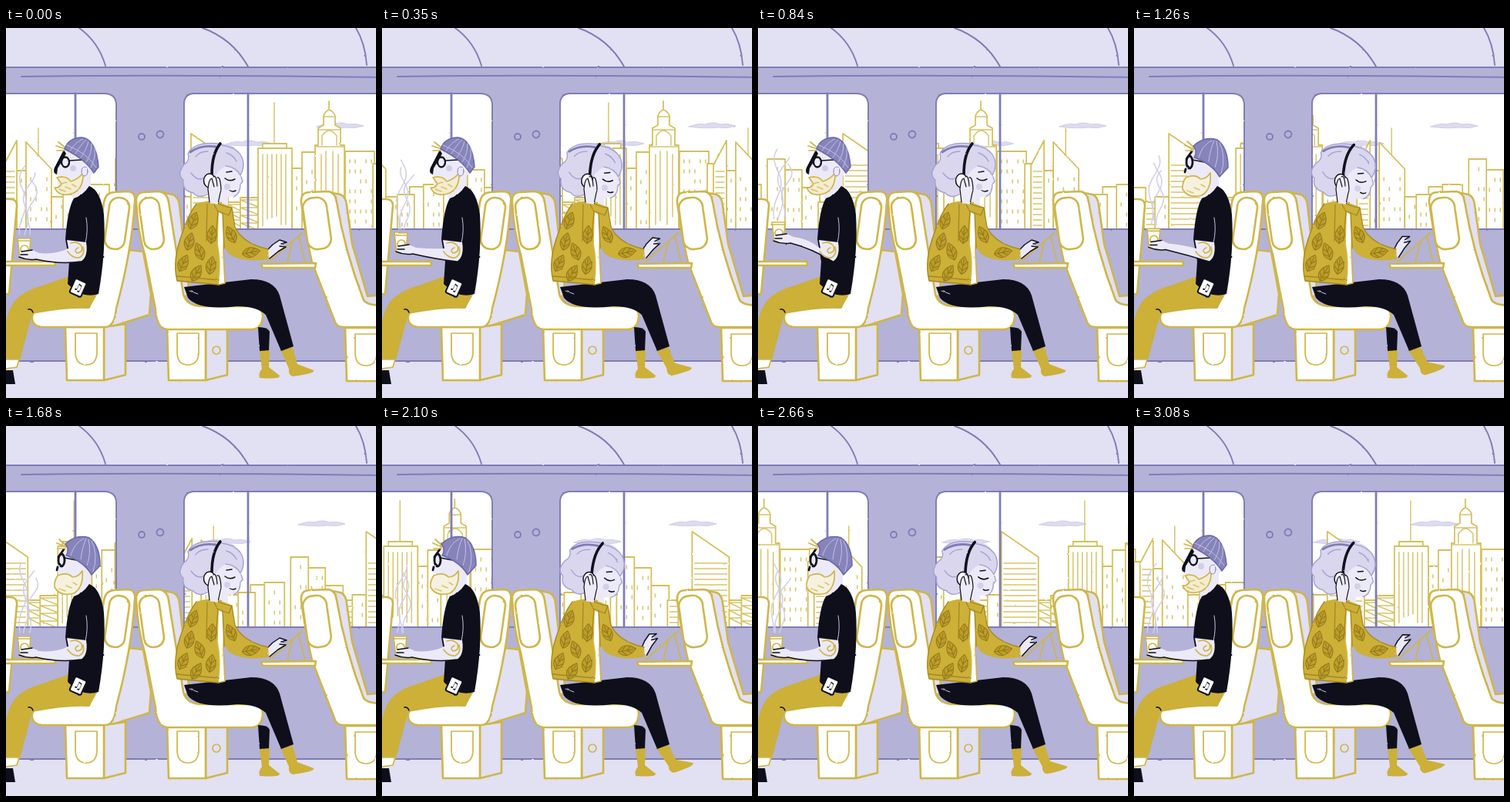
An HTML page for the animation above (3150 ms loop, 480 by 480 pixels).

```html
<!DOCTYPE html>
<html lang="en">
<head>
<meta charset="utf-8">
<title>Train ride</title>
<style>
html, body { margin: 0; width: 100%; height: 100%; overflow: hidden; background: #e3e1f4 }
svg { display: block; width: 100vw; height: 100vh }
path, rect, circle, ellipse { stroke-linecap: round; stroke-linejoin: round }
.gold { stroke: #cfb649; stroke-width: 2.6 }
.thin { stroke-width: 1.7 }
.white { fill: #fff }
.lilac { fill: #e2e0f3 }
.line { fill: none; stroke: #7f7cb6; stroke-width: 1.9 }
.ink { fill: none; stroke: #10111d; stroke-width: 1.5 }
.bold { stroke-width: 2.8 }
.black { fill: #0e0f1b }
.skin { fill: #eceaf8 }
.cloth { fill: #ccb038 }
.seam { fill: none; stroke: #a48820; stroke-width: 1.3 }
.leaf { fill: #bd9f2b; stroke: #95791a; stroke-width: 1.2 }
.cap { fill: #8684bb; stroke: #6b68a6; stroke-width: 1.5 }
.rib { fill: none; stroke: #c3c1e2; stroke-width: 1 }
.city { fill: #fff; stroke: #d5c05c; stroke-width: 1.8 }
.mark { fill: none; stroke: #d8c56c; stroke-width: 1.5 }
.cloud { fill: #dddbf0; stroke: #d0ceea; stroke-width: 1 }
.steam { fill: none; stroke: #d0cee9; stroke-width: 1.5 }
</style>
</head>
<body>
<svg viewBox="0 0 480 480">
<defs>
  <filter id="rough" x="-10" y="-10" width="500" height="500" filterUnits="userSpaceOnUse" color-interpolation-filters="sRGB">
    <feTurbulence type="fractalNoise" baseFrequency=".13" numOctaves="2" seed="4"/>
    <feDisplacementMap in="SourceGraphic" scale="1.7" xChannelSelector="R" yChannelSelector="G"/>
  </filter>
  <path id="panes" d="M-9 85H129Q143 86 143 100V261H-9ZM490 85H243Q231 86 231 99V261H490Z"/>
  <clipPath id="view"><use href="#panes"/></clipPath>
  <g id="skyline"></g>
  <path id="leaf" class="leaf" d="M0 13Q-14 3 0 -13Q14 3 0 13V-9M0 8l6-6M0 8l-6-6M0 1l4-6M0 1l-4-6"/>
  <path id="puff" class="cloud" d="M-30 1Q-18-4-9-2Q2-6 10-2Q20-4 31 0Q20 4 8 2Q-8 4-30 1Z"/>
  <g id="base">
    <path class="lilac gold" d="M50 0L78-4V62L50 69Z"/>
    <path class="white gold" d="M0 0H50V69H2Z"/>
    <path class="white gold thin" d="M13 8H41V34Q40 49 27 49Q14 49 13 34Z"/>
  </g>
</defs>
<g filter="url(#rough)">
  <rect class="lilac" x="-9" y="-9" width="498" height="498"/>
  <rect fill="#b4b2d7" x="-9" y="51" width="498" height="381"/>
  <path class="line" d="M-9 51H490M20 63Q200 60 490 64M-9 432H490M95 0Q120 18 129 49M255 0Q294 14 314 50M454 0Q466 20 468 48"/>
  <circle class="line" cx="176" cy="141" r="4"/><circle class="line" cx="200" cy="138" r="4.5"/>
  <use href="#panes" fill="#fff"/>
  <g clip-path="url(#view)">
    <use id="cloud1" href="#puff"/><use id="cloud2" href="#puff"/>
    <g id="city"><use href="#skyline"/><use href="#skyline" x="487"/></g>
  </g>
  <path class="line bold" d="M90 85V261M314 85V261"/>
  <use href="#panes" class="line"/>
  <path class="line" d="M143 261H231"/>

  <!-- far seats -->
  <path class="white gold" d="M-8 222H5Q15 222 14 232L4 345H-8Z"/>
  <path class="lilac gold" d="M418 213L434 216Q441 219 442 230L449 280L469 348L490 346V364H466Z"/>
  <path class="white gold" d="M383 226Q382 213 394 213L418 212Q427 213 429 226Q440 292 464 353Q468 360 490 360V388H438Q428 388 426 379L397 304Q388 265 383 226Z"/>
  <rect class="white gold" x="388" y="220" width="31" height="67" rx="13" transform="rotate(-8 403 254)"/>
  <use href="#base" x="440" y="389"/>

  <!-- left seat -->
  <path class="lilac gold" d="M160 288L178 290L188 345L186 372L135 388Z"/>
  <use href="#base" x="77" y="388"/>
  <path class="white gold" d="M127 226Q129 214 140 213L158 212Q169 213 167 226Q163 290 143 364Q141 388 128 388H47Q33 387 34 374Q37 362 55 362H108Z"/>
  <rect class="white gold" x="131" y="220" width="26" height="67" rx="12" transform="rotate(8 144 254)"/>

  <!-- middle seat -->
  <path class="lilac gold" d="M200 213L216 216Q224 219 225 230L238 345L222 355Z"/>
  <use href="#base" x="209" y="388"/>
  <circle class="gold thin" fill="none" cx="273" cy="418" r="5"/>
  <path class="white gold" d="M169 226Q168 213 180 213L198 212Q209 213 211 226L230 345Q234 361 255 361H322Q333 363 333 374Q332 390 319 391H209Q195 389 194 365L180 294Q171 265 169 226Z"/>
  <rect class="white gold" x="176" y="220" width="26" height="67" rx="12" transform="rotate(-8 189 254)"/>

  <!-- man -->
  <path class="white gold" d="M-8 303H64V308H-8Z"/>
  <path class="cloth" d="M88 320L45 335Q8 345 2 374L-8 405V431H18L34 371Q80 362 108 364L119 344Z"/>
  <path class="white gold thin" d="M-8 430H17L14 440L-8 443Z"/>
  <path class="black" d="M-8 444H9L12 462H-8Z"/>
  <path class="ink" d="M29 365Q33 364 35 369"/>
  <path class="skin" d="M84 190H110V222H86Z"/>
  <path class="black" d="M108 205Q123 211 127 242Q130 288 120 345Q99 352 80 332L82 303L77 274Q80 234 88 221Q100 217 108 205Z"/>
  <path class="rib" d="M104 246Q107 262 103 279"/>
  <g id="steam"></g>
  <g id="cup">
    <path class="white gold thin" d="M15 273H32L30 299H18ZM14 276H32"/>
    <circle class="white gold thin" cx="24" cy="287" r="5"/>
  </g>
  <path id="arm" class="skin"/><path id="armLine" class="ink"/>
  <path class="gold thin" fill="none" d="M84 279Q93 276 98 283Q101 291 92 292Q87 288 94 285M80 290Q86 299 95 298Q103 294 100 284"/>
  <g transform="rotate(24 94 336)">
    <rect class="white" stroke="#10111d" stroke-width="2" x="86" y="327" width="16" height="20" rx="2"/>
    <text x="94" y="341" text-anchor="middle" font-family="DejaVu Sans, sans-serif" font-size="13" fill="#10111d">♫</text>
  </g>
  <g id="headA">
    <path class="skin" d="M77 157L62 184Q61 190 67 192V205Q80 213 98 206L114 187L100 160Z"/>
    <path fill="#f3ecd0" class="gold thin" d="M66 194Q78 191 84 199Q94 196 100 188Q101 207 88 214Q69 221 63 207Q69 208 72 202Z"/>
    <path class="mark" d="M69 209l8 3M77 206l7 3M86 203l5 3M72 202l7-2"/>
    <path class="black" d="M75 158L63 181Q60 188 66 190L67 182L73 172L78 163Z"/>
    <ellipse class="ink" style="stroke-width:2.3" cx="77" cy="174" rx="5" ry="6.5"/>
    <path class="ink" d="M82 172L99 171"/>
    <circle fill="#cfcdea" cx="87" cy="182" r="4"/>
    <ellipse class="skin" stroke="#8684bb" cx="102" cy="186" rx="4" ry="6"/>
    <path class="gold thin" fill="none" d="M78 156L68 148M77 157L65 153M76 159L66 159"/>
    <path class="cap" d="M76 157Q81 142 99 142Q117 145 120 180L114 188Q104 171 76 157Z"/>
    <path class="rib" d="M83 159Q90 148 100 144M90 163Q98 150 104 145M97 168Q105 157 107 147M104 174Q112 161 111 150M110 181Q117 168 115 155M79 152Q105 162 117 181"/>
  </g>
  <g id="headB">
    <path class="skin" d="M77 157L65 184Q65 190 70 192V206Q84 214 100 206L114 187L100 160Z"/>
    <path fill="#f6f1de" class="gold thin" d="M67 194Q80 189 86 196Q94 196 99 188Q101 209 88 217Q70 222 63 209Q62 202 67 194Z"/>
    <path class="mark" d="M69 211l8 3M78 207l7 3M87 203l5 3"/>
    <path class="ink bold" d="M75 160L68 170M67 183l-1 4"/>
    <ellipse class="ink bold" cx="72" cy="174" rx="4" ry="8"/>
    <path class="ink" d="M76 171L91 174"/>
    <path class="gold thin" fill="none" d="M79 156L69 147M78 157L66 152M77 159L67 159"/>
    <path class="cap" d="M77 153Q91 140 108 145Q122 155 122 181L111 193Q101 176 78 168Q83 160 77 153Z"/>
    <path class="rib" d="M84 168Q88 152 101 146M97 173Q99 156 104 146M105 181Q111 165 107 147M113 189Q120 166 111 149"/>
  </g>

  <!-- laptop -->
  <path class="white gold" d="M331 306L402 305L401 311L333 311Z"/>
  <path class="gold thin" fill="none" d="M342 303L384 266M371 279L365 303M380 271L388 304"/>

  <!-- woman -->
  <path class="black" d="M327 388Q340 388 342 394L341 419H329Z"/>
  <path class="cloth" d="M329 419L342 418L341 440L355 451Q356 456 329 454Q327 448 332 442Z"/>
  <path id="foot" class="cloth" d="M356 417L371 413L378 436L399 444Q402 448 372 452Q366 450 367 442Z"/>
  <path class="black" d="M231 336L318 326Q348 326 355 347L373 413L357 419L337 372Q325 361 300 361Q250 367 236 350Z"/>
  <path class="rib" d="M238 341l11 4"/>
  <g id="hand">
    <path class="skin" d="M336 289L346 281L355 275L364 278L358 281L363 284L353 290L341 299Z"/>
    <path class="ink" d="M338 289L346 281L355 275L364 278L357 280M355 283L363 284L353 290L342 299"/>
  </g>
  <path class="skin" d="M268 208H288V232H268Z"/>
  <path class="cloth" d="M247 228Q262 222 280 226L278 333L222 328Q215 302 229 265Q237 241 247 228Z"/>
  <path class="white gold thin" d="M275 238L284 242L282 290L284 331L275 333Q279 305 274 280Z"/>
  <path class="cloth" d="M268 224Q284 228 293 233L297 258Q306 279 340 287L341 300Q306 305 289 293L283 284L281 242Z"/>
  <g id="leaves"></g>
  <path class="seam" d="M247 228Q237 241 229 265Q215 302 222 328L276 333M261 229L260 276M275 238L272 276M281 240L283 286M293 233L297 258Q306 279 340 287M222 322L276 327M268 224Q281 232 293 233L289 243L274 237Z"/>
  <g id="head">
    <path class="skin" d="M272 170L301 176Q306 185 305 193L307 199L304 203Q304 218 293 219Q276 222 266 212Z"/>
    <path fill="#d9d6ee" d="M276 150Q244 147 236 163Q239 172 231 177Q221 190 230 197Q228 211 243 214Q250 222 262 216L268 200Q274 184 285 179Q298 180 304 191Q314 176 302 161Q292 148 276 150Z"/>
    <path class="line" style="stroke:#a5a2d0;stroke-width:1.4" d="M276 150Q244 147 236 163Q239 172 231 177Q221 190 230 197Q228 211 243 214Q250 222 261 216M280 152Q296 154 304 164Q312 177 304 191Q298 180 285 179M246 167Q251 160 262 160M240 188Q248 199 256 195M286 162Q295 165 299 173M305 193L307 199L304 203Q304 216 295 219"/>
    <path class="line bold" d="M239 161Q253 151 272 154"/>
    <path class="ink" d="M284 195Q290 200 297 196M286 187L293 186M291 211Q294 213 298 211"/>
    <circle fill="#d3d0ec" cx="287" cy="206" r="4"/>
    <path class="ink" style="stroke-width:3.6" d="M278 150Q267 163 267 190"/>
    <ellipse class="ink" style="fill:#f8f7fd" cx="264" cy="198" rx="7.5" ry="9"/>
  </g>
  <path class="skin" d="M264 227L262 209Q263 196 267 195L270 203L269 193Q273 190 274 202L274 194Q278 192 279 209L275 229Z"/>
  <path class="ink" style="stroke-width:1.2" d="M262 209Q263 196 267 195L270 206M269 193Q273 190 274 205M274 194Q278 192 279 209L275 228M264 226L262 209"/>
</g>
</svg>
<script>
const LOOP = 3150, STEP = 70, WIDTH = 487;
const $ = id => document.getElementById(id);
const move = (id, x, y) => $(id).setAttribute('transform', `translate(${x} ${y})`);
const shape = (cls, d) => `<path class="${cls}" d="${d}"/>`;

let seed = 7;
const rand = () => (seed = seed * 16807 % 2147483647) / 2147483647;

// Linear interpolation through [position, value] points
function along(points, at) {
  const i = Math.max(1, points.findIndex(p => p[0] >= at));
  const [[a, u], [b, v]] = [points[i - 1], points[i]];
  return u + (v - u) * (at - a) / (b - a);
}

// Left, right, height at left, height at right, surface
const buildings = [
  [288, 306, 226, 226, 'truss'], [304, 327, 220, 220, 'truss'],
  [371, 387, 182, 182, 'dots'], [384, 402, 161, 161, 'dots'],
  [333, 364, 150, 150, ''], [327, 371, 156, 156, 'lines'],
  [440, 478, 160, 160, 'dots'], [476, 485, 176, 176, ''],
  [14, 26, 185, 185, 'dots'], [26, 59, 148, 183, 'dots'], [-3, 14, 178, 146, 'bars'],
  [59, 76, 219, 219, 'dots'], [90, 109, 206, 206, 'dots'], [74, 96, 216, 216, 'dots'],
  [108, 134, 203, 203, 'dots'], [186, 210, 207, 207, 'dots'], [163, 187, 184, 184, 'dots'],
  [142, 165, 170, 170, 'dots'], [208, 226, 226, 226, 'bars'], [222, 240, 219, 219, 'dots'],
  [240, 288, 137, 170, 'bars']
];

function building([l, r, a, b, kind]) {
  let d = '';
  const top = Math.max(a, b) + 8, roof = x => a + (b - a) * (x - l) / (r - l);
  if (kind == 'dots')
    for (let y = top + 3; y < 254; y += 13)
      for (let x = l + 6; x < r - 2; x += 7) if (rand() < .55) d += `M${x} ${y}v4`;
  if (kind == 'bars') for (let y = top; y < 258; y += 7) d += `M${l + 3} ${y}H${r - 3}`;
  if (kind == 'lines') for (let x = l + 6; x < r - 3; x += 6) d += `M${x} ${a + 8}V${225 + rand() * 33}`;
  if (kind == 'truss') for (let y = a + 3; y < 255; y += 10) d += `M${l} ${y}L${r} ${y + 9}M${r} ${y}H${l}`;
  return shape('city', `M${l} 264V${roof(l)}L${r} ${roof(r)}V264`) + shape('mark', d);
}

$('skyline').innerHTML =
  shape('mark', 'M348 97V150M42 130V165') +
  buildings.map(building).join('') +
  shape('city', 'M401 264V152H405V130L412 126V114Q414 108 419 106Q425 108 427 114V126L434 130V152H439V264M419 95V106') +
  shape('mark', 'M405 132H434M401 154H439M412 115H427M410 152V140Q419 126 429 140V152M409 164V255M415 160V250M424 160V255M431 164V245');

$('leaves').innerHTML = [[243, 250, 20], [238, 277, 15], [230, 305, 25], [251, 290, -20],
  [247, 318, 30], [266, 308, 10], [267, 268, 5], [292, 268, -25], [318, 291, 80]]
  .map(([x, y, turn]) => `<use href="#leaf" transform="translate(${x} ${y}) rotate(${turn}) scale(.9)"/>`).join('');

function wisp(n, step, x, y) {
  let d = '';
  for (let h = 0; h <= 82; h += 4) {
    const sway = Math.sin(h * .1 - step * 2 * Math.PI * 4 / 45 + n * 1.8) * (2 + h * .07);
    d += `${h ? 'L' : 'M'}${(x + n * 5 + sway + h * .08).toFixed(1)} ${y - h * (1 - n * .12)}`;
  }
  return shape('steam', d);
}

function draw(step) {
  move('city', -step * WIDTH / 45, 0);
  move('cloud1', 433 - step, 127);
  move('cloud2', 315 - step * 1.2, 150);

  // The man lifts his cup, then looks aside
  const lift = along([[0, 0], [2, 0], [5, 7], [12, 21], [16, 21], [21, 0], [45, 0]], step);
  const x = 24 + lift * .15, y = 294 - lift;
  move('cup', x - 24, -lift);
  $('arm').setAttribute('d', `M79 275L81 286Q65 ${y} ${x + 19} ${y - 2}L${x + 10} ${y - 6}L${x - 4} ${y - 4}L${x - 7} ${y + 3}Q${x + 4} ${y + 8} ${x + 15} ${y + 6}Q70 ${y + 13} 97 303Q107 297 104 278Z`);
  $('armLine').setAttribute('d', `M${x + 10} ${y - 6}L${x - 4} ${y - 4}M${x - 7} ${y + 3}Q${x + 4} ${y + 8} ${x + 15} ${y + 6}Q70 ${y + 13} 97 303M${x - 5} ${y}h9`);
  $('steam').innerHTML = [-1, 0, 1].map(n => wisp(n, step, x, 268 - lift)).join('');
  const aside = step > 17 && step < 42;
  $('headA').style.display = aside ? 'none' : '';
  $('headB').style.display = aside ? '' : 'none';

  // The woman keeps the beat four times per loop
  const beat = along([[0, 0], [.15, 0], [.42, .45], [.67, 1], [.91, .8], [1, 0]], step * 4 / 45 % 1);
  $('head').setAttribute('transform', `translate(${beat * 3} ${beat}) rotate(${beat * 5} 270 215)`);
  $('foot').setAttribute('transform', `rotate(${-beat * 11} 364 417)`);
  $('hand').setAttribute('transform', `rotate(${-beat * 22} 338 294)`);
}

let last = -1;
function tick() {
  const step = Math.floor(performance.now() % LOOP / STEP);
  if (step != last) draw(last = step);
  requestAnimationFrame(tick);
}
tick();
</script>
</body>
</html>
```
